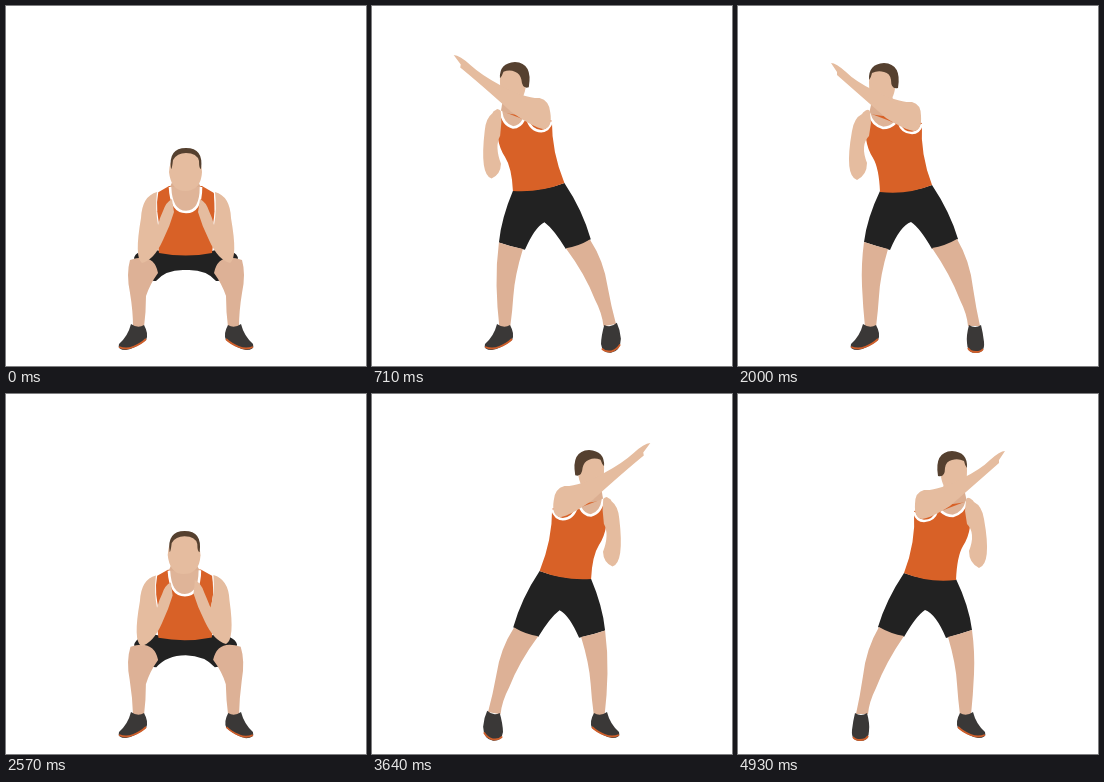
An HTML page without scripts for the animation above (5000 ms loop, 360 by 360 pixels).

```html
<!DOCTYPE html>
<html lang="en">
<head>
<meta charset="utf-8">
<title>Squat with cross punch</title>
<style>
html, body { margin: 0; width: 100%; height: 100%; overflow: hidden; background: #fff; }
svg { display: block; width: 100%; height: 100%; }

/* Each part carries four poses: a squat, b rising, c standing, d full reach. */
.p { d: var(--a); animation: move 5s -6ms infinite; }
.body { transform-origin: 180px 0; animation: turn 5s -6ms step-end infinite; }

.skin { fill: #e5bc9f; }
.leg { fill: #ddb196; }
.neck { fill: #dbae91; }
.shirt { fill: #d86127; }
.shorts { fill: #222; }
.shoe { fill: #3a3837; }
.hair { fill: #55402f; }
.trim { fill: none; stroke: #fff; stroke-width: 2.6; }
.collar { fill: #dfb498; stroke: #fff; stroke-width: 2.6; }
.sole { fill: none; stroke: #cf5f2b; stroke-width: 1.8; }

/* The first half punches left, the second half right. */
@keyframes turn {
  0% { transform: scaleX(-1); }
  58.571%, 100% { transform: none; }
}

/* 14 poses a second, with the easing sampled at each step. */
@keyframes move {
  0%, 58.571% {
    d: var(--a);
    animation-timing-function: linear(0 0% 25%, .1 25% 50%, .35 50% 75%, .67 75% 100%, 1);
  }
  5.714%, 64.286% {
    d: var(--b);
    animation-timing-function: linear(0 0% 20%, .25 20% 40%, .47 40% 60%, .67 60% 80%, .85 80% 100%, 1);
  }
  12.857%, 71.429% {
    d: var(--c);
    animation-timing-function: linear(0 0% 12.5%, .18 12.5% 25%, .37 25% 37.5%, .55 37.5% 50%, .71 50% 62.5%, .84 62.5% 75%, .93 75% 87.5%, .98 87.5% 100%, 1);
  }
  24.286%, 82.857% { d: var(--d); }
  28.571%, 87.143% {
    d: var(--d);
    animation-timing-function: linear(0 0% 12.5%, .02 12.5% 25%, .07 25% 37.5%, .16 37.5% 50%, .29 50% 62.5%, .45 62.5% 75%, .63 75% 87.5%, .82 87.5% 100%, 1);
  }
  40%, 98.571% {
    d: var(--c);
    animation-timing-function: linear(0 0% 20%, .15 20% 40%, .33 40% 60%, .53 60% 80%, .75 80% 100%, 1);
  }
  47.143% {
    d: var(--b);
    animation-timing-function: linear(0 0% 20%, .33 20% 40%, .65 40% 60%, .9 60% 80%, .98 80% 100%, 1);
  }
  54.286% { d: var(--a); }
  100% { d: var(--c); }
}
</style>
</head>
<body>
<svg viewBox="0 0 360 360">
<g class="body">
  <path class="p shorts" style="
    --a:path('M150 244Q130 243 128 252Q136 276 150 275Q160 263 180 264Q200 263 210 275Q224 276 232 252Q230 243 210 244Q180 252 150 244Z');
    --b:path('M155 209Q143 226 137 240Q150 237 162 258Q172 250 183 236Q196 248 207 258Q214 242 231 241Q222 222 214 212Q185 218 155 209Z');
    --c:path('M166 179Q148 206 140 233Q152 242 166 243Q178 222 187 216Q198 220 208 244Q222 240 234 236Q231 212 218 185Q190 188 166 179Z');
    --d:path('M175 168Q156 196 147 235Q155 243 167 243Q178 230 190 217Q194 226 203 243Q218 244 229 239Q230 215 221 177Q200 178 175 168Z')"/>

  <!-- legs -->
  <path class="p leg" style="
    --a:path('M124 254Q120 268 124 287Q127 305 127 321L138 321Q140 306 140 290Q144 278 152 267Q148 246 124 254Z');
    --b:path('M137 241Q129 254 126 276Q124 300 127 321L137 321Q139 306 142 292Q144 274 161 255Q152 237 137 241Z');
    --c:path('M141 233Q128 255 125 282Q122 302 118 320L130 320Q131 308 138 294Q148 268 166 242Q153 240 141 233Z');
    --d:path('M147 236Q128 256 121 278Q115 297 107 309L122 321Q124 305 133 291Q142 268 167 243Q158 243 147 236Z')"/>
  <path class="p leg" style="
    --a:path('M236 254Q240 268 236 287Q233 305 233 321L222 321Q220 306 220 290Q216 278 208 267Q212 246 236 254Z');
    --b:path('M231 241Q241 258 239 277Q237 300 233 321L222 321Q221 308 221 293Q219 272 207 257Q215 242 231 241Z');
    --c:path('M234 236Q237 258 236 280Q235 302 233 321L222 321Q220 305 219 290Q218 270 210 243Q222 240 234 236Z');
    --d:path('M229 239Q231 258 233 278Q235 300 231 321L221 321Q218 305 217 288Q214 268 205 243Q218 244 229 239Z')"/>

  <!-- turning shoe -->
  <path class="p shoe" style="
    --a:path('M125 318Q132 323 138 319Q143 328 140 334Q128 343 120 344Q111 344 113 338Q122 330 125 318Z');
    --b:path('M125 319Q131 323 136 319Q139 328 136 334Q128 346 120 346Q111 346 114 339Q121 331 125 319Z');
    --c:path('M117 319Q123 323 129 319Q132 330 131 337Q131 347 122 347Q113 347 114 336Q115 327 117 319Z');
    --d:path('M107 307Q113 320 122 319Q126 332 131 343Q124 349 117 346Q105 338 98 318Q97 311 107 307Z')"/>
  <path class="p sole" style="
    --a:path('M113 341Q120 344 127 341Q135 338 140 333');
    --b:path('M114 342Q120 347 126 343Q133 338 136 333');
    --c:path('M115 343Q117 346 122 346Q128 346 130 342');
    --d:path('M98 317Q104 333 114 342Q122 348 131 345')"/>

  <!-- planted shoe -->
  <g transform="matrix(-1 0 0 1 360 0)">
    <path class="shoe" d="M125 318Q132 323 138 319Q143 328 140 334Q128 343 120 344Q111 344 113 338Q122 330 125 318Z"/>
    <path class="sole" d="M113 341Q120 344 127 341Q135 338 140 333"/>
  </g>

  <!-- torso -->
  <path class="p shirt" style="
    --a:path('M152 187Q150 222 154 247Q180 252 207 247Q209 235 210 220Q211 200 209 187L197 180L164 180Z');
    --b:path('M167 137Q164 180 156 212Q185 220 213 215Q211 196 213 186Q220 165 220 141L208 137L176 134Z');
    --c:path('M176 117Q178 148 166 179Q190 189 218 186Q219 162 225 152Q236 135 231 108L226 106L200 112Z');
    --d:path('M199 104Q191 135 175 168Q198 176 224 180Q226 160 236 147Q248 128 245 105L240 94L222 96Z')"/>
  <path class="p neck" style="
    --a:path('M170 172L192 172L197 183L164 183Z');
    --b:path('M184 128L205 128L208 139L176 136Z');
    --c:path('M206 90L225 90L229 108L201 112Z');
    --d:path('M226 80L243 80L242 100L226 102Z')"/>
  <path class="p collar" style="
    --a:path('M165 181Q165 206 180 206Q195 206 196 181');
    --b:path('M176 134Q178 157 191 158Q203 158 207 138');
    --c:path('M203 117Q208 122 215 122Q226 119 229 107');
    --d:path('M231 97Q230 118 237 119Q245 118 241 95')"/>
  <path class="p trim" style="
    --a:path('M151 186Q149 196 150 206Q151 214 152 220');
    --b:path('M167 137Q166 142 166 147Q167 152 169 157');
    --c:path('M176 118Q179 127 186 127Q196 127 199 117');
    --d:path('M199 104Q202 116 213 117Q225 115 229 97')"/>
  <path class="p trim" style="
    --a:path('M209 186Q211 196 210 206Q209 214 208 220');
    --b:path('M220 141Q221 147 221 152Q220 158 218 164');
    --c:path('M231 108Q231 110 231 112Q231 114 231 116');
    --d:path('M249 112Q249 113 249 114Q249 115 249 116')"/>

  <!-- guarding arm -->
  <path class="p skin" style="
    --a:path('M209 186Q224 190 225 212Q232 252 224 257Q212 254 203 234Q196 220 192 206L193 200L194 193Q200 196 203 205Q206 211 208 219Q211 203 209 186Z');
    --b:path('M220 141Q235 143 236 165Q245 206 231 207Q220 203 215 188Q210 173 206 162L205 156L206 149Q210 146 212 155Q216 160 218 167Q222 157 220 141Z');
    --c:path('M236 108Q244 112 246 125Q254 170 241 174Q231 169 231 157Q238 139 229 130L227 117L228 106Q229 103 231 104Q232 104 233 105Q235 106 236 108Z');
    --d:path('M256 104Q256 113 253 122Q246 163 238 166Q233 166 231 161Q236 146 245 128L247 112L246 101Q248 104 251 98Q252 99 253 101Q256 100 256 104Z')"/>

  <!-- head -->
  <path class="p skin" style="
    --a:path('M164 166Q165 146 180 146Q196 146 197 166Q195 185 181 185Q165 185 164 166Z');
    --b:path('M179 118Q179 97 194 97Q210 97 210 116Q209 136 196 136Q181 136 179 118Z');
    --c:path('M203 83Q205 63 216 63Q229 63 229 76Q229 100 219 100Q206 100 203 83Z');
    --d:path('M222 78Q224 58 236 58Q246 58 246 68Q246 96 237 96Q225 96 222 78Z')"/>
  <path class="p hair" style="
    --a:path('M165 163Q162 142 180 142Q198 142 195 163Q194 163 193 154Q189 147 180 147Q169 147 167 155Q167 163 165 163Z');
    --b:path('M179 115Q176 93 193 93Q211 94 209 114Q207 110 206 103Q200 99 194 100Q186 100 184 105Q184 113 179 115Z');
    --c:path('M200 82Q196 58 214 57Q230 58 229 74Q227 72 226 67Q220 64 214 66Q208 67 207 74Q207 84 200 82Z');
    --d:path('M218 78Q213 53 231 52Q246 53 246 64Q243 61 240 60Q234 60 231 64Q229 70 227 73Q223 80 218 78Z')"/>

  <!-- punching arm -->
  <path class="p skin" style="
    --a:path('M151 186Q136 190 135 212Q128 252 136 257Q148 254 157 234Q164 220 168 206L167 200L166 193Q160 196 157 205Q154 211 152 219Q149 203 151 186Z');
    --b:path('M167 137Q151 142 150 157Q158 186 176 187Q190 182 200 167Q208 153 213 140L214 133L218 124Q212 125 207 134Q203 150 188 163Q169 157 167 137Z');
    --c:path('M186 96Q177 98 177 110Q176 124 184 125Q193 124 212 112Q244 84 261 69L261 66L267 57Q262 57 252 66Q243 75 225 84Q200 97 186 96Z');
    --d:path('M222 74Q208 79 203 92Q195 111 207 115Q228 108 262 77Q297 42 321 28L318 24L330 13Q318 16 304 28Q285 42 262 57Q240 72 222 74Z')"/>
</g>
</svg>
</body>
</html>
```
